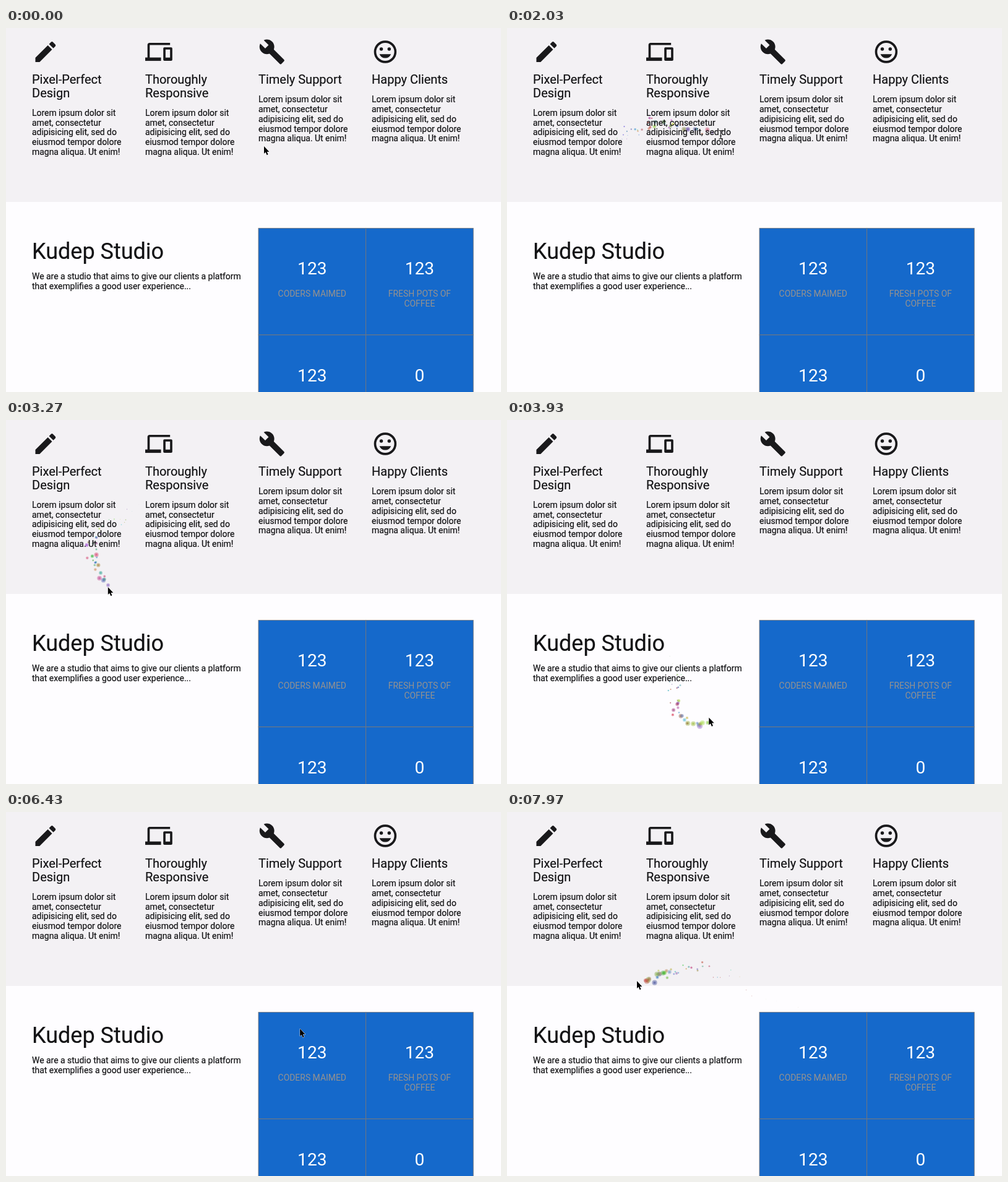
Animation, 800 px wide and 588 px high, one loop 8000 ms. Source, as an HTML page with a canvas:

```html
<!DOCTYPE html>
<html lang="en">
<head>
<meta charset="utf-8">
<title>Cursor trail</title>
<style>
  html, body { margin: 0; width: 100%; height: 100%; overflow: hidden; background: #fefdff; }
  canvas, svg { position: absolute; left: 0; top: 0; width: 800px; height: 588px; }
  canvas { background: linear-gradient(#f3f1f4 280.5px, #fefdff 280.5px); }
  text { font-family: Roboto, sans-serif; }
  #copy { fill: #121214; stroke: #121214; stroke-width: .2; }
  #stats { text-anchor: middle; }
</style>
</head>
<body>
<canvas id="trail" width="800" height="588"></canvas>
<svg id="page" viewBox="0 0 800 588">
  <g id="icons" fill="#19191b" stroke="#19191b" stroke-width="0"></g>
  <g id="copy"></g>
  <g id="tiles" fill="#1569cb" stroke="#757679" stroke-width=".9"></g>
  <g id="stats"></g>
  <path id="arrow" d="M0 0V12l2.6-2.4 2 4.6 2-.9-1.9-4.4h3.7Z" stroke="#fff" paint-order="stroke"/>
  <path id="beam" d="M-3-7Q0-7 0-5Q0-7 3-7M0-5V5M-3 7Q0 7 0 5Q0 7 3 7M-1.5 2H1.5" fill="none" stroke="#222" stroke-width="1.2"/>
</svg>
<script>
const LOOP = 8000, LIFE = 400, LAG = 20, EMIT_EVERY = 9;
const $ = id => document.getElementById(id);

function add(parent, tag, attrs, content = '') {
  const el = document.createElementNS('http://www.w3.org/2000/svg', tag);
  for (const name in attrs) el.setAttribute(name, attrs[name]);
  parent.append(el);
  el.innerHTML = content;
}

function lines(parent, x, y, size, leading, rows, attrs = {}) {
  rows.forEach((row, i) =>
    add($(parent), 'text', { x, y: y + i * leading, 'font-size': size, ...attrs }, row));
}

const BODY = 13.95, BODY_LEADING = 15.7, TITLE = 20, TITLE_LEADING = 21.6;
const lorem = ['Lorem ipsum dolor sit', 'amet, consectetur', 'adipisicing elit, sed do',
  'eiusmod tempor dolore', 'magna aliqua. Ut enim!'];

// Icons are drawn on a 24-unit grid.
const features = [
  [['Pixel-Perfect', 'Design'],
    '<path d="M3 17.25V21H6.75L17.8 9.95 14.05 6.2ZM15.1 5.1 17 3.3Q17.7 2.7 18.4 3.3L20.7 5.6Q21.3 6.3 20.7 7L18.9 8.9Z"/>'],
  [['Thoroughly', 'Responsive'],
    '<path d="M0 17H14V20H0Z"/><path d="M22 5H4Q3 5 3 6V18M17 9H23V19H17ZM17 18H23" fill="none" stroke-width="2" stroke-linejoin="round"/>'],
  [['Timely Support'],
    '<path d="M22.7 19 13.6 9.9C14.5 7.6 14 4.9 12.1 3 10.1 1 7.1.6 4.7 1.7L9 6 6 9 1.6 4.7C.4 7.1.9 10.1 2.9 12.1 4.8 14 7.5 14.5 9.8 13.6L18.9 22.7Q19.6 23.3 20.3 22.7L22.6 20.4Q23.3 19.7 22.7 19Z"/>'],
  [['Happy Clients'],
    '<circle cx="12" cy="12" r="9" fill="none" stroke-width="2"/><circle cx="8.5" cy="9.5" r="1.5"/><circle cx="15.5" cy="9.5" r="1.5"/><path d="M6.9 14H17.1A5.5 5.5 0 0 1 6.9 14"/>'],
];

features.forEach(([title, icon], i) => {
  const x = 42 + i * 183;
  add($('icons'), 'g', { transform: `translate(${x} 16.6) scale(1.825)` }, icon);
  lines('copy', x, 90, TITLE, TITLE_LEADING, title);
  lines('copy', x, 120.4 + (title.length - 1) * TITLE_LEADING, BODY, BODY_LEADING, lorem);
});
lines('copy', 42, 373, 36, 0, ['Kudep Studio']);
lines('copy', 42, 406, BODY, BODY_LEADING,
  ['We are a studio that aims to give our clients a platform', 'that exemplifies a good user experience...']);

const stats = [['123', 'CODERS MAIMED'], ['123', 'FRESH POTS OF', 'COFFEE'], ['123'], ['0']];
const TILE_W = 173.6, TILE_H = 172.4;
stats.forEach(([count, ...label], i) => {
  const x = 408 + i % 2 * TILE_W, y = 323.4 + (i >> 1) * TILE_H, middle = x + TILE_W / 2;
  add($('tiles'), 'rect', { x, y, width: TILE_W, height: TILE_H });
  lines('stats', middle, y + 74.8, 28.1, 0, [count], { fill: '#fff' });
  lines('stats', middle, y + 110.6, BODY, BODY_LEADING, label, { fill: '#96928f' });
});

// Turning points of the pointer: time, x, y. It rests until the first one.
const turns = [
  [270, 417, 191], [750, 465, 215], [1090, 410, 202], [1340, 262, 289], [1470, 170, 256],
  [1850, 230, 150], [2280, 520, 213], [2470, 535, 130], [2630, 425, 94],
  [3050, 140, 190], [3570, 262, 390], [3770, 272, 465], [3930, 326, 481],
  [4350, 440, 300], [4850, 540, 380], [5270, 480, 406],
  [5700, 430, 230], [6080, 580, 370], [6430, 475, 350],
  [7100, 735, 400], [7500, 632, 414], [7660, 348, 260], [7970, 210, 273],
];
const last = turns.length - 1;

// Cubic curve through the turning points, with speeds taken from the neighbours.
function pointer(t) {
  const next = Math.min(Math.max(turns.findIndex(p => p[0] > t), 0) || (t < turns[0][0] ? 1 : last), last);
  const a = turns[next - 1], b = turns[next], span = b[0] - a[0];
  const u = Math.min(Math.max((t - a[0]) / span, 0), 1);
  const speed = (i, axis) => {
    const p = turns[Math.max(i - 1, 0)], n = turns[Math.min(i + 1, last)];
    return (n[axis] - p[axis]) / (n[0] - p[0]) * span;
  };
  return [1, 2].map(axis => a[axis] + (b[axis] - a[axis]) * u * u * (3 - 2 * u)
    + speed(next - 1, axis) * u * (1 - u) ** 2 - speed(next, axis) * u * u * (1 - u));
}

function random(seed) {
  const v = Math.sin(seed * 12.9898) * 43758.5453;
  return v - Math.floor(v);
}

const ctx = $('trail').getContext('2d');

function dot(x, y, r, alpha) {
  ctx.globalAlpha = alpha;
  ctx.beginPath();
  ctx.arc(x, y, r, 0, 2 * Math.PI);
  ctx.fill();
}

function drawTrail(t) {
  ctx.clearRect(0, 0, 800, 588);
  const first = Math.ceil(Math.max(turns[0][0], t - LIFE) / EMIT_EVERY);
  for (let i = first; i * EMIT_EVERY < t - LAG; i++) {
    const born = i * EMIT_EVERY, age = (t - born) / LIFE;
    const [x, y] = pointer(born);
    const rnd = k => random(i * 7 + k);
    const spread = 8 + 20 * age;
    const px = x + 3 + (rnd(1) - .5) * spread, py = y + 3 + (rnd(2) - .5) * spread;
    const r = (2 + 3.4 * rnd(3)) * (1 - age);
    ctx.fillStyle = `hsl(${360 * rnd(4)} ${30 + 40 * rnd(5)}% ${38 + 22 * rnd(6)}%)`;
    dot(px, py, r, .42);
    dot(px, py, r * .5, .5);
  }
}

const textBoxes = [...document.querySelectorAll('text')].map(el => el.getBBox());

function drawPointer(t) {
  const [x, y] = pointer(t);
  const overText = textBoxes.some(b => x > b.x && x < b.x + b.width && y > b.y && y < b.y + b.height);
  for (const id of ['arrow', 'beam']) {
    $(id).setAttribute('transform', `translate(${x} ${y})`);
    $(id).style.display = overText === (id === 'beam') ? '' : 'none';
  }
}

const start = performance.now();
function frame() {
  const t = (performance.now() - start) % LOOP;
  drawTrail(t);
  drawPointer(t);
  requestAnimationFrame(frame);
}
frame();
</script>
</body>
</html>
```
